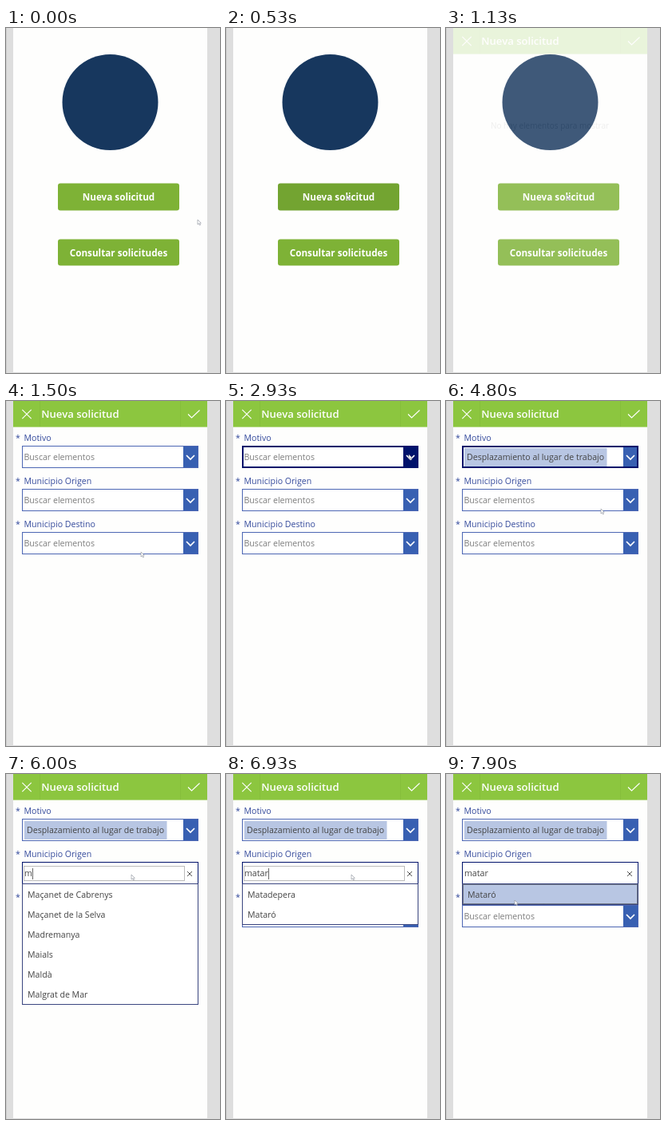
Write an HTML page with a canvas that moves like this. It is 268 px wide and 432 px high and loops after 8000 ms.

```html
<!DOCTYPE html>
<html lang="es">
<head>
<meta charset="utf-8">
<title>Nueva solicitud</title>
<style>
html, body { margin: 0; width: 100%; height: 100%; overflow: hidden; background: #dedede; }
canvas { display: block; width: 268px; height: 432px; }
</style>
</head>
<body>
<canvas id="stage" width="268" height="432"></canvas>
<script>
const stage = document.getElementById('stage');
const ctx = stage.getContext('2d');
const layer = document.createElement('canvas');
layer.width = stage.width;
layer.height = stage.height;
const layerCtx = layer.getContext('2d');

const LOOP = 8000;
const FONT = '"Open Sans", sans-serif';
const PAPER = '#fefefd', HEADER = '#8cc63f', BUTTON = '#7eb236', BUTTON_HOVER = '#73a431';
const BLUE = '#3860b2', NAVY = '#00126b', LABEL = '#344a9c', HINT = '#7c7c7c', INK = '#444';
const SELECTED = '#b8c6e3';
const ROW = 25, FIELD_H = 28;

const REASONS = ['Adquisición de alimentos', 'Asistencia a centros sanitarios',
  'Desplazamiento al lugar de trabajo', 'Retorno a la residencia habitual',
  'Cuidado de personas mayores', 'Causa de fuerza mayor'];
const TOWNS = ['Maçanet de Cabrenys', 'Maçanet de la Selva', 'Madremanya', 'Maials',
  'Maldà', 'Malgrat de Mar'];

// Pointer path: time, x, y
const POINTER = [
  [0, 240, 240], [30, 240, 240], [180, 226, 246], [530, 151, 209], [1200, 151, 209],
  [1500, 169, 189], [1900, 228, 66], [2230, 229, 67], [3030, 229, 67], [3300, 230, 67],
  [3620, 244, 88], [4100, 200, 126], [4230, 198, 148], [4500, 198, 148],
  [4800, 194, 135], [4960, 193, 132], [5385, 193, 132], [5400, 157, 126],
  [7230, 157, 126], [7870, 86, 158], [8000, 86, 158]
];
const KEYS = [6000, 6090, 6210, 6330, 6660];

function pointerAt(t) {
  const i = Math.max(1, POINTER.findIndex(p => p[0] > t));
  const [t0, x0, y0] = POINTER[i - 1], [t1, x1, y1] = POINTER[i];
  const k = (t - t0) / (t1 - t0), e = k * k * (3 - 2 * k);
  return { x: x0 + (x1 - x0) * e, y: y0 + (y1 - y0) * e };
}

function box(x, y, w, h, color) {
  ctx.fillStyle = color;
  ctx.fillRect(x, y, w, h);
}

function frame(x, y, w, h, color, width = 1, dash = []) {
  ctx.strokeStyle = color;
  ctx.lineWidth = width;
  ctx.setLineDash(dash);
  ctx.strokeRect(x + width / 2, y + width / 2, w - width, h - width);
  ctx.setLineDash([]);
}

function line(points, color, width) {
  ctx.beginPath();
  points.forEach(([x, y]) => ctx.lineTo(x, y));
  ctx.strokeStyle = color;
  ctx.lineWidth = width;
  ctx.stroke();
}

function cross(x, y, r, color, width) {
  line([[x - r, y - r], [x + r, y + r]], color, width);
  line([[x + r, y - r], [x - r, y + r]], color, width);
}

// The y value is the baseline.
function text(str, x, y, color, size = 10.6, weight = 400, align = 'left') {
  ctx.font = `${weight} ${size}px ${FONT}`;
  ctx.textAlign = align;
  ctx.fillStyle = color;
  ctx.fillText(str, x, y);
}

function button(label, y, h, color) {
  ctx.beginPath();
  ctx.roundRect(65, y, 152, h, 3);
  ctx.fillStyle = color;
  ctx.fill();
  text(label, 141, y + h / 2 + 4.6, '#fff', 11.7, 700, 'center');
}

function homeScreen(t, pointer) {
  box(9, 0, 243, 431, PAPER);
  ctx.beginPath();
  ctx.arc(130.5, 93, 60, 0, Math.PI * 2);
  ctx.fillStyle = '#17375e';
  ctx.fill();
  const hover = t < 900 && pointer.x < 217 && pointer.y < 229;
  button('Nueva solicitud', 194.5, 34, hover ? BUTTON_HOVER : BUTTON);
  button('Consultar solicitudes', 264.5, 33, BUTTON);
}

function header() {
  box(9, 0, 243, 32.6, HEADER);
  box(42, 0, 1, 32, '#86bf3b');
  box(218, 0, 1, 32, '#86bf3b');
  cross(26, 16.5, 5.7, '#fff', 1.1);
  line([[228, 16.5], [232.5, 21], [242.5, 11.5]], '#fff', 1.1);
  text('Nueva solicitud', 44.3, 21.3, '#fff', 13.1, 600);
}

function field(label, y, opt = {}) {
  text('*', 12, y - 6, LABEL);
  text(label, 22.5, y - 6, LABEL);
  box(20, y, 221, FIELD_H, '#fff');
  if (opt.selected) box(23, y + 3, 178.5, 23, SELECTED);
  if (opt.value) text(opt.value, opt.selected ? 26 : 23, y + 18.4, INK);
  else text('Buscar elementos', 22.5, y + 18.4, HINT);

  if (opt.clearable) {
    cross(230, y + 15, 3, '#555', 1);
  } else {
    box(222, y, 19, FIELD_H, opt.hot ? NAVY : BLUE);
    line([[226, y + 12], [231, y + 17], [236, y + 12]], '#fff', 1.7);
  }
  frame(20, y, 221, FIELD_H, opt.focus ? NAVY : '#4d67b4', opt.focus || 1);
  if (opt.dotted) frame(22, y + 5, 202, 19, '#777', 1, [1, 1]);
  if (opt.caret) {
    const x = 23 + ctx.measureText(opt.value).width;
    box(Math.round(x), y + 8, 1, 14, '#666');
  }
}

function list(items, y, pointer, pressed) {
  const h = items.length * ROW;
  box(20, y, 221, h + 1, '#fff');
  items.forEach((item, i) => {
    const top = y + i * ROW;
    const hover = pointer.x < 241 && pointer.y >= top && pointer.y < top + ROW;
    if (hover || pressed) box(21, top, 219, ROW, SELECTED);
    text(item, 27, top + 17, INK);
  });
  frame(20, y - 1, 221, h + 2, '#3b4680');
  if (pressed) frame(21, y, 219, h, '#222', 1, [1, 1]);
}

function formScreen(t, pointer) {
  box(9, 0, 243, 431, PAPER);
  header();
  if (t < 1230) {
    text('No hay elementos para mostrar', 130, 125.5, '#aaa', 10, 400, 'center');
    return;
  }
  const typed = 'matar'.slice(0, KEYS.filter(k => t >= k).length);
  const chosen = t >= 4500;
  const onOrigin = t >= 5160;
  const pressed = t >= 7870;

  field('Motivo', 56, {
    value: chosen ? REASONS[2] : '',
    selected: chosen,
    hot: t >= 1945 && !chosen,
    focus: t >= 2230 && !onOrigin ? 2 : 0
  });
  field('Municipio Origen', 110, {
    value: typed,
    clearable: typed,
    focus: onOrigin ? 1 : 0,
    dotted: typed && !pressed,
    caret: typed && !pressed
  });
  field('Municipio Destino', 164);

  if (t >= 3030 && t < 4500) list(REASONS, 84, pointer, false);
  if (t >= 7200) list(['Mataró'], 138, pointer, pressed);
  else if (t >= 6930) list(['Matadepera', 'Mataró'], 138, pointer, false);
  else if (t >= 6000) list(TOWNS, 138, pointer, false);
}

function cursor({ x, y }) {
  ctx.beginPath();
  [[0, 0], [0, 6], [1.5, 4.8], [2.6, 7], [3.5, 6.5], [2.6, 4.4], [4.3, 4.2]]
    .forEach(([dx, dy]) => ctx.lineTo(x + dx, y + dy));
  ctx.closePath();
  ctx.fillStyle = '#fff';
  ctx.fill();
  ctx.strokeStyle = '#858a96';
  ctx.lineWidth = 0.6;
  ctx.stroke();
}

function draw(t) {
  const pointer = pointerAt(t);
  const fade = t < 1100 ? 0 : Math.min(1, (t - 1090) / 240);
  box(0, 0, 268, 432, '#dedede');
  box(0, 0, 1, 432, '#cbcbcb');
  if (fade > 0) formScreen(t, pointer);
  if (fade < 1) {
    // Blend the finished form as one layer over the home screen.
    layerCtx.drawImage(stage, 0, 0);
    homeScreen(t, pointer);
    if (fade > 0) {
      ctx.globalAlpha = fade;
      ctx.drawImage(layer, 0, 0);
      ctx.globalAlpha = 1;
    }
  }
  cursor(pointer);
}

function tick() {
  draw(performance.now() % LOOP);
  requestAnimationFrame(tick);
}
tick();
</script>
</body>
</html>
```
